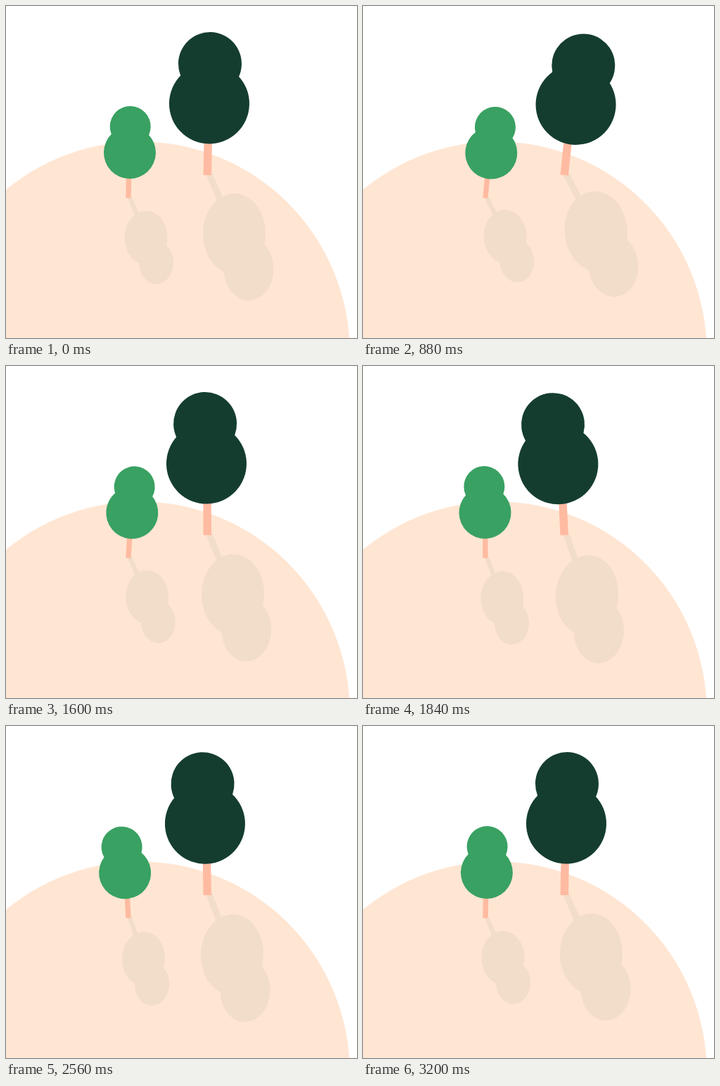
Write an HTML page that moves like this. It is 499 px wide and 471 px high and loops after 3240 ms.

```html
<!DOCTYPE html>
<html lang="en">
<head>
<meta charset="utf-8">
<title>Swaying trees</title>
<style>
  html, body { margin: 0; width: 100%; height: 100%; overflow: hidden; background: #fff; }
  svg { display: block; width: 499px; height: 471px; }
  .ground { fill: #ffe6d3; }
  .shadow { fill: #f2ddca; }
  .trunk { fill: #ffbba1; }
  .dark { fill: #143d30; }
  .green { fill: #39a162; }
</style>
</head>
<body>
<svg viewBox="0 0 499 471">
  <circle class="ground" cx="190" cy="491" r="298.7"/>

  <g class="shadow" id="smallShadow">
    <path d="M173 273L179 271L192 301L186 304Z"/>
    <ellipse cx="199" cy="328.7" rx="30.5" ry="38.2"/>
    <ellipse cx="213.5" cy="364" rx="24.5" ry="30.5"/>
  </g>
  <g class="shadow" id="bigShadow">
    <path d="M285 241L293 237L312 281L304 285Z"/>
    <ellipse cx="324.5" cy="323" rx="44.5" ry="57"/>
    <ellipse cx="345" cy="373" rx="35.5" ry="45"/>
  </g>

  <rect class="trunk" id="bigTrunk" x="280.5" y="180" width="11.5" height="60"/>
  <g class="dark" id="bigCrown">
    <circle cx="287.6" cy="138.5" r="57"/>
    <circle cx="287.6" cy="82" r="45"/>
  </g>

  <rect class="trunk" id="smallTrunk" x="170.3" y="235" width="7.4" height="37.5"/>
  <g class="green" id="smallCrown">
    <circle cx="175" cy="208" r="37"/>
    <circle cx="175" cy="171" r="29"/>
  </g>
</svg>
<script>
  const LOOP = 3240, STEP = 40;

  // turn: angle at rest and gain per pixel of sway, both in radians
  const trees = [
    { name: 'big', delay: 0, reach: 14, parts: [
      { id: 'Crown', pivot: [287.6, 217], rest: 0.0175, gain: 1 / 79 },
      { id: 'Trunk', pivot: [286.2, 240], rest: 0.02, gain: 0.0059 },
      { id: 'Shadow', pivot: [287, 240], rest: 0, gain: -0.006 }
    ] },
    { name: 'small', delay: 240, reach: 8.5, parts: [
      { id: 'Crown', pivot: [175, 256], rest: 0.02, gain: 1 / 48 },
      { id: 'Trunk', pivot: [174, 272.5], rest: 0.02, gain: 0.011 },
      { id: 'Shadow', pivot: [174.5, 272], rest: 0, gain: -0.009 }
    ] }
  ];

  // [time, sway]: lean right, lean left, settle
  const keys = [[0, 0], [960, 1], [2040, -1], [3000, 0]];
  const ease = u => (1 - Math.cos(Math.PI * u)) / 2;

  function sway(t) {
    for (let i = 1; i < keys.length; i++) {
      const [t0, v0] = keys[i - 1], [t1, v1] = keys[i];
      if (t < t1) return v0 + (v1 - v0) * ease(Math.max(0, t - t0) / (t1 - t0));
    }
    return 0;
  }

  function draw(t) {
    for (const tree of trees) {
      const offset = tree.reach * sway(t - tree.delay);
      for (const { id, pivot, rest, gain } of tree.parts) {
        const angle = (rest + gain * offset) * 180 / Math.PI;
        document.getElementById(tree.name + id)
          .setAttribute('transform', `rotate(${angle} ${pivot})`);
      }
    }
  }

  const start = performance.now();
  function tick() {
    const t = (performance.now() - start) % LOOP;
    draw(Math.floor(t / STEP) * STEP);
    requestAnimationFrame(tick);
  }
  tick();
</script>
</body>
</html>
```
